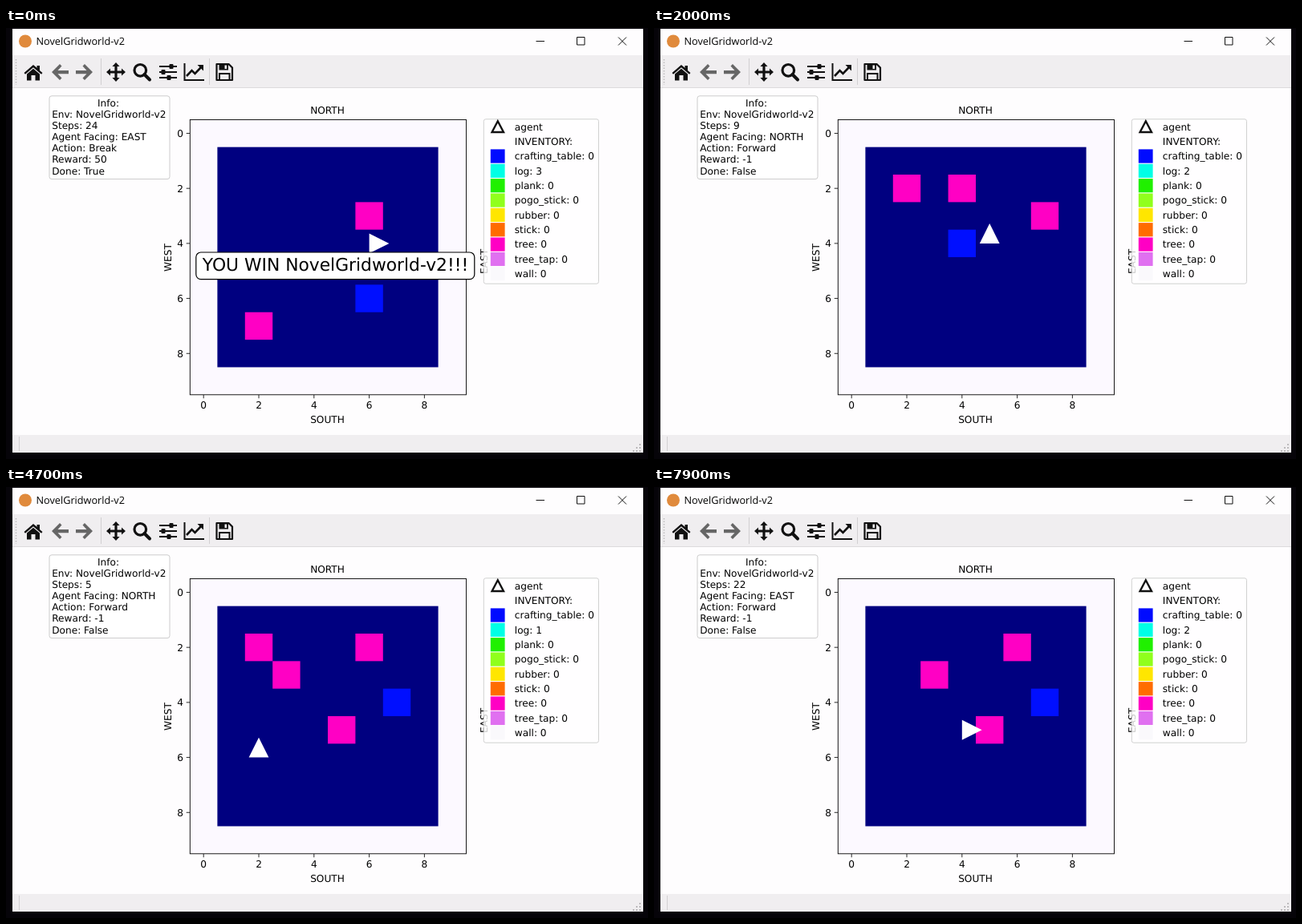
An HTML page that plays this animation: 800 by 538 pixels, repeating every 8000 ms.

```html
<!DOCTYPE html>
<html lang="en">
<head>
<meta charset="utf-8">
<title>NovelGridworld-v2</title>
<style>
  html, body { margin: 0; width: 100%; height: 100%; overflow: hidden; background: #060409; }
  svg { display: block; width: 800px; height: 538px; }
  text { font: 12.15px "DejaVu Sans", sans-serif; fill: #000; white-space: pre; text-rendering: geometricPrecision; }
  .title { font: 12.7px "Open Sans", sans-serif; }
  .win { font-size: 21.8px; }
  .mid { text-anchor: middle; }
  .end { text-anchor: end; }
  .line { fill: none; stroke: #111; }
</style>
</head>
<body>
<svg id="stage" viewBox="0 0 800 538"></svg>
<script>
const LOOP = 8000, CELL_W = 34.4, CELL_H = 34.35, LEFT = 229, TOP = 114.3;
const NAVY = '#000080', TREE = '#ff00c4', TABLE = '#000fff', WALL = '#fcf9ff';
const HEADINGS = ['NORTH', 'EAST', 'SOUTH', 'WEST'];
const VECTORS = [[0, -1], [1, 0], [0, 1], [-1, 0]];
const ACTIONS = { F: 'Forward', L: 'Left', R: 'Right', B: 'Break' };
const ITEMS = [
  ['crafting_table', '#000bff'], ['log', '#00ffe6'], ['plank', '#20f000'],
  ['pogo_stick', '#90ff1c'], ['rubber', '#ffe600'], ['stick', '#ff6c00'],
  ['tree', TREE], ['tree_tap', '#e070f0'], ['wall', '#faf9fc']
];

// Each episode: start state, then one action letter per time (in 100 ms units).
const EPISODES = [
  { step: 23, log: 2, x: 6, y: 4, dir: 1, table: [6, 6],
    trees: [[6, 3], [2, 7], [7, 4]], actions: 'B', times: [0] },
  { step: 0, log: 0, x: 6, y: 7, dir: 3, table: [4, 4],
    trees: [[2, 2], [4, 2], [7, 3], [5, 6], [4, 7]],
    actions: 'FBLLLBFFFFFLFB',
    times: [4, 6, 8, 10, 12, 14, 15, 17, 19, 21, 22, 24, 25, 27] },
  { step: 0, log: 0, x: 2, y: 7, dir: 3, table: [7, 4],
    trees: [[2, 2], [6, 2], [3, 3], [5, 5], [2, 6]],
    actions: 'LLLBFFFBBBBFBLLLRFFLFF',
    times: [40, 42, 44, 46, 47, 49, 51, 53, 54, 56, 57, 59, 61, 63, 64, 66, 68, 70, 72, 74, 76, 78] }
];

function play(episode) {
  let { step, log, x, y, dir, trees, table } = episode;
  return [...episode.actions].map((key, i) => {
    const [dx, dy] = VECTORS[dir];
    const ahead = ([tx, ty]) => tx === x + dx && ty === y + dy;
    const facesTree = trees.some(ahead);
    if (key === 'L') dir = (dir + 3) % 4;
    if (key === 'R') dir = (dir + 1) % 4;
    if (key === 'F' && !facesTree) { x += dx; y += dy; }
    if (key === 'B' && facesTree) { trees = trees.filter(t => !ahead(t)); log++; }
    return { time: episode.times[i] * 100, step: ++step, action: ACTIONS[key], log, x, y, dir, trees, table, won: log === 3 };
  });
}
const states = EPISODES.flatMap(play);

const rect = (x, y, w, h, fill, extra = '') =>
  `<rect x="${x}" y="${y}" width="${w}" height="${h}" fill="${fill}" ${extra}/>`;
const label = (x, y, str, cls = '', extra = '') => `<text x="${x}" y="${y}" class="${cls}" ${extra}>${str}</text>`;
const path = (d, width = 1, extra = '') => `<path class="line" d="${d}" stroke-width="${width}" ${extra}/>`;
const solid = (d, fill = '#111', extra = '') => `<path d="${d}" fill="${fill}" ${extra}/>`;
const cellX = c => LEFT + CELL_W * c;
const cellY = r => TOP + CELL_H * r;
const cell = ([c, r], fill) => rect(cellX(c), cellY(r), CELL_W, CELL_H, fill);

function windowChrome() {
  const grip = [[0, 0], [-4, 4], [0, 4], [-8, 8], [-4, 8], [0, 8]];
  const arrow = 'M57 55L67 45L69.5 47.5L64.5 53H78V57.3H64.5L69.5 62.5L67 65Z';
  const mover = [0, 90, 180, 270].map(a =>
    solid('M-1.6 0V-7H-4.6L0 -12L4.6 -7H1.6V0Z', '#111', `transform="translate(137 55) rotate(${a})"`)).join('');
  const sliders = [[48, 206], [55, 196], [62, 203]].map(([y, x]) =>
    path(`M191 ${y}H213`, 2) + rect(x - 2.5, y - 3, 5, 6, '#111', 'rx="1"')).join('');
  return rect(0, 0, 800, 538, '#060409') +
    rect(8, 1, 786, 529, '#fefdfe') +
    rect(8, 34, 786, 40.5, '#f0eef0') + rect(8, 74, 786, 1, '#dcdadc') +
    rect(8, 508, 786, 22, '#f0eef0') +
    '<circle cx="24" cy="16.5" r="8" fill="#e08a3c"/>' +
    label(37.5, 21.3, 'NovelGridworld-v2', 'title') +
    path('M660.5 16.5H671M711.5 11.5H721V21H711.5ZM763 11.5L773 21.5M773 11.5L763 21.5') +
    path('M12.5 39V71', 1.5, 'style="stroke:#bbb" stroke-dasharray="1.5 2"') +
    path('M118.5 38V71M253.5 38V71M16.5 510V528', 1, 'style="stroke:#d2d0d2"') +
    solid('M22.5 56L34 46L38.5 49.8V47H42V53L45.5 56L44 57.8L34 49.2L24 57.8Z') +
    solid('M26 57.5L34 50.8L42 57.5V65.5H36.5V59H31.5V65.5H26Z') +
    solid(arrow, '#666') + solid(arrow, '#666', 'transform="translate(165 0) scale(-1 1)"') +
    mover +
    '<circle cx="167.3" cy="52.8" r="7.3" class="line" stroke-width="3.2"/>' +
    path('M172.5 58L179 64.5', 4, 'stroke-linecap="round"') +
    sliders +
    path('M222.5 44V65H247', 2) + path('M225 60L231.5 53L235.5 57L243.5 48.5', 2.6) +
    solid('M238.5 46H246V53.5Z') +
    path('M262.5 45H277.5L282 49.5V65H262.5Z', 2.2, 'stroke-linejoin="round"') +
    path('M266 64V57H278.5V64', 2) +
    solid('M265.5 45H277V52.5H265.5ZM272.5 46.5V51H275V46.5Z', '#111', 'fill-rule="evenodd"') +
    grip.map(([x, y]) => rect(789 + x, 519 + y, 2, 2, '#bcbabc')).join('');
}

function ticks() {
  return [0, 2, 4, 6, 8].map(n => {
    const x = cellX(n + .5), y = cellY(n + .5);
    return path(`M${x} 458V462.3M229 ${y}H224.7`, .9) +
      label(x, 475.4, n, 'mid') + label(221, y + 4.5, n, 'end');
  }).join('');
}

function legend() {
  const rowY = i => 123.2 + 18.35 * i;
  const box = rect(595.3, 113.8, 143.2, 205.4, '#fff', 'fill-opacity=".8" stroke="#ccc" stroke-opacity=".9" rx="2.5"');
  const rows = ITEMS.map(([name, color], i) => {
    const y = rowY(i + 2);
    return rect(603.8, y - 8.5, 17.8, 17.2, color) +
      label(633.8, y + 4.4, `${name}: 0`, '', `id="${name}"`);
  });
  return box + path('M612.8 116.3L620 130H605.6Z', 2.4) +
    label(633.8, rowY(0) + 4.4, 'agent') + label(633.8, rowY(1) + 4.4, 'INVENTORY:') + rows.join('');
}

function infoBox() {
  const ids = ['env', 'steps', 'facing', 'action', 'reward', 'done'];
  return rect(54, 84.8, 150, 103.8, '#fff', 'stroke="#ccc" rx="3"') +
    label(114, 97.9, 'Info:') +
    ids.map((id, i) => label(57.2, 112 + 14.12 * i, id === 'env' ? 'Env: NovelGridworld-v2' : '', '', `id="${id}"`)).join('');
}

const stage = document.getElementById('stage');
stage.innerHTML = windowChrome() +
  rect(LEFT, TOP, CELL_W * 10, CELL_H * 10, WALL) +
  rect(cellX(1), cellY(1), CELL_W * 8, CELL_H * 8, NAVY) +
  '<g id="blocks"></g>' + solid('M0 -12.4L24.8 0L0 12.4Z', '#fff', 'id="agent"') +
  rect(229.3, 114.5, 344.2, 343.3, 'none', 'stroke="#000" stroke-width=".9"') + ticks() +
  label(400.5, 106.6, 'NORTH', 'mid') + label(400.5, 493, 'SOUTH', 'mid') +
  label(0, 0, 'WEST', 'mid', 'transform="translate(205.5 286.5) rotate(-90)"') +
  label(0, 0, 'EAST', 'mid', 'transform="translate(600 291.5) rotate(-90)"') +
  legend() + infoBox() +
  '<g id="banner">' + rect(236.8, 280, 347, 33.6, '#fff', 'stroke="#000" stroke-width="1.2" rx="6"') +
  label(410.5, 303.2, 'YOU WIN NovelGridworld-v2!!!', 'win mid') + '</g>';

const byId = id => document.getElementById(id);
const write = (id, str) => { byId(id).textContent = str; };

function show(s) {
  write('steps', `Steps: ${s.step}`);
  write('facing', `Agent Facing: ${HEADINGS[s.dir]}`);
  write('action', `Action: ${s.action}`);
  write('reward', `Reward: ${s.won ? 50 : -1}`);
  write('done', `Done: ${s.won ? 'True' : 'False'}`);
  write('log', `log: ${s.log}`);
  byId('blocks').innerHTML = s.trees.map(t => cell(t, TREE)).join('') + cell(s.table, TABLE);
  byId('agent').setAttribute('transform',
    `translate(${cellX(s.x + .5)} ${cellY(s.y + .5)}) rotate(${s.dir * 90 - 90})`);
  byId('banner').style.display = s.won ? '' : 'none';
}

let current;
function tick() {
  const time = performance.now() % LOOP;
  const state = states.findLast(s => s.time <= time);
  if (state !== current) show(current = state);
  requestAnimationFrame(tick);
}
tick();
</script>
</body>
</html>
```
